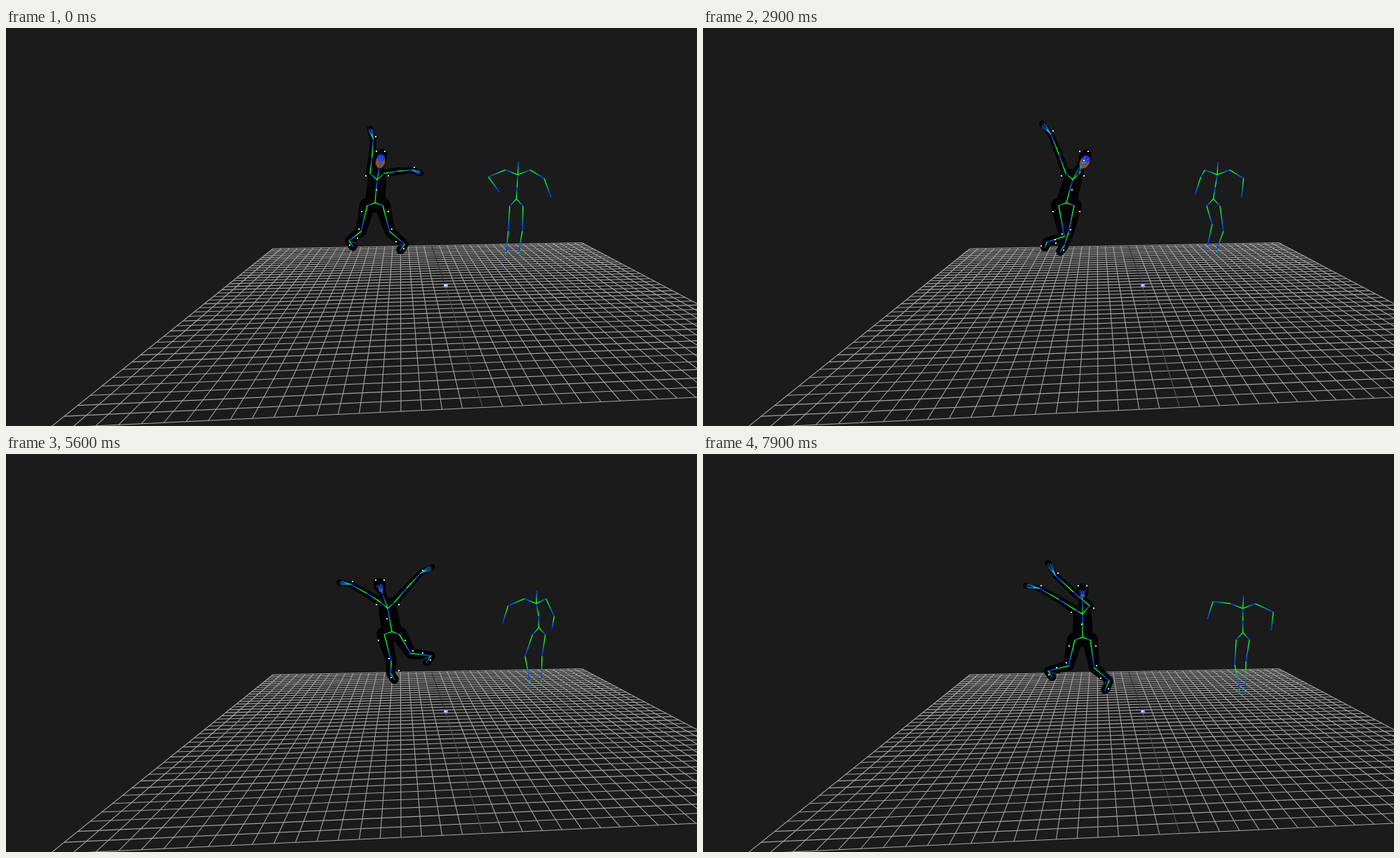
These frames come from a looping animation (985 by 568 pixels, 8000 ms). An HTML page with a canvas:

```html
<!DOCTYPE html>
<html lang="en">
<head>
<meta charset="utf-8">
<title>Motion capture stage</title>
<style>
html, body { margin: 0; width: 100%; height: 100%; overflow: hidden; background: #1b1b1b; }
canvas { display: block; }
</style>
</head>
<body>
<canvas id="stage" width="985" height="568"></canvas>
<script>
const W = 985, H = 568, LOOP = 8000, STEP = 100;
const BODY = '#020202', SKIN = '#8a5232', GREEN = '#06e822', BLUE = '#0c38ff', CYAN = '#22a8f0';
const ctx = document.getElementById('stage').getContext('2d');

const mix = (a, b, k) => a + (b - a) * k;
const along = (a, b, k) => [mix(a[0], b[0], k), mix(a[1], b[1], k)];
const add = (p, x, y) => [p[0] + x, p[1] + y];
const bump = (t, at, width) => Math.exp(-(((t - at) / width) ** 2));
const ramp = (t, from, to) => {
  const k = Math.min(1, Math.max(0, (t - from) / (to - from)));
  return k * k * (3 - 2 * k);
};

// Offsets a point by a rest vector plus weighted moves [amount, dx, dy].
function reach(from, x, y, ...moves) {
  for (const [k, dx, dy] of moves) { x += k * dx; y += k * dy; }
  return add(from, x, y);
}

// An arm from its heading (degrees clockwise from up) and length, bowed slightly.
function swingArm(shoulder, degrees, length, bow) {
  const a = degrees * Math.PI / 180, s = Math.sin(a), c = Math.cos(a);
  return [[0, 0], [0.36, 0.6], [0.75, 1], [1, 0]].map(([k, b]) =>
    add(shoulder, s * length * k + c * bow * b, s * bow * b - c * length * k));
}

function dancerPose(t) {
  const kneel = bump(t, 2900, 600), turn = bump(t, 4600, 500);
  const kick = bump(t, 5600, 400), hop = bump(t, 6400, 400);
  const back = ramp(t, 1500, 2900), cross = ramp(t, 2900, 4600), open = ramp(t, 4600, 5600);
  const lift = ramp(t, 5600, 6400), late = ramp(t, 6400, 7900);

  const pelvis = [526 - 8 * back + 32 * open - 9 * late, 249.5 + 4 * cross + 8 * late];
  const lean = 3 * bump(t, 0, 700) + 9 * kneel + 3 * turn - 6 * kick;
  const chest = add(pelvis, lean, -33);
  const head = add(chest, lean * 1.8, -30);
  const shoulder = side => add(chest, side * (10 - 4 * turn) - 7 * turn, -9 - 3 * side * lift);
  const hip = side => add(pelvis, side * 11 * (1 - 1.4 * turn), 4);

  const headL = -96 * bump(t, 1500, 650) - 45 * bump(t, 2550, 450) - 62 * bump(t, 3900, 350)
    - 68 * bump(t, 5500, 450) - 21 * lift - 43 * ramp(t, 6400, 7300);
  const lenL = 80 - 15 * bump(t, 0, 500) - 35 * bump(t, 1500, 600) - 14 * kick;
  const headR = 90 - 58 * back - 70 * cross + 85 * open + 13 * lift - 104 * late;
  const lenR = 53 - 34 * back + 22 * cross + 33 * open + 12 * lift;

  const kneeL = reach(hip(-1), -9, 37,
    [bump(t, 1500, 700), 6, 0], [kneel, 17, 7], [turn, -5, 0], [kick, 19, 2], [hop, 5, -6]);
  const ankleL = reach(kneeL, -17, 13,
    [kneel, -8, -5], [turn, -5, 14], [kick, 16, 4], [hop, -3, -12], [late, -12, -6]);
  const kneeR = reach(hip(1), 10, 37,
    [kneel, -18, 2], [turn, 15, -2], [kick, 6, -10], [hop, -21, 3], [late, -4, 3]);
  const ankleR = reach(kneeR, 21, 18,
    [kneel, -27, 0], [turn, -39, 16], [kick, 9, -15], [hop, -8, 4]);

  return {
    pelvis, chest, head, lean,
    front: 1 - 0.75 * open, profile: 3 * (kneel + turn),
    arms: [swingArm(shoulder(-1), headL, lenL, 5), swingArm(shoulder(1), headR, lenR, -5)],
    legs: [
      [hip(-1), kneeL, ankleL, reach(ankleL, 6, 9, [kneel + turn, -9, -1])],
      [hip(1), kneeR, ankleR, reach(ankleR, -6, 9, [hop, -13, -1], [late, 0, 5])]
    ]
  };
}

function stickPose(t) {
  const turn = bump(t, 4600, 550), kick = bump(t, 4600, 450), fold = bump(t, 6100, 700);
  const crouch = bump(t, 3000, 700), walk = ramp(t, 4600, 5600), late = ramp(t, 6400, 7900);
  const pelvis = [727.5 + 32 * walk + 10 * late, 244 + 4 * ramp(t, 3500, 5600) + 7 * late];
  const lean = 2 + 6 * bump(t, 3700, 1100) - 6 * bump(t, 5600, 500) - 2 * late;
  const neck = add(pelvis, lean, -34.5);
  const waist = add(along(pelvis, neck, 0.48), 3 * fold - 4 * turn, 0);
  const shoulder = side => add(neck, side * 17.5 * (1 - turn) + 4 * turn - 5 * fold * (side > 0), -7);
  const hip = side => add(pelvis, side * 9.5 * (1 - turn) + 5 * turn, 10 - 6 * turn);

  const armL = [shoulder(-1)], armR = [shoulder(1)], legL = [hip(-1)], legR = [hip(1)];
  armL[1] = reach(armL[0], -25, 10, [bump(t, 2500, 1300), 21, 0], [turn, 39, 4], [late, 0, -13]);
  armL[2] = reach(armL[1], -8, 25, [bump(t, 0, 600), 24, -3], [turn, -7, -5], [bump(t, 6400, 500), 8, 2]);
  armR[1] = reach(armR[0], 20, 12, [fold, -14, 22], [late, 6, 0]);
  armR[2] = reach(armR[1], 10, 27, [ramp(t, 1800, 3000), -13, 0], [fold, 0, -16]);

  legL[1] = reach(legL[0], -2, 36, [bump(t, 3200, 900), 11, 0], [crouch, 0, -10], [bump(t, 5700, 500), -9, -5]);
  legL[2] = reach(legL[1], -3, 30, [bump(t, 3800, 1000), -8, 0], [walk, 10, 4]);
  legL[3] = add(legL[2], -2, 7);
  legR[1] = reach(legR[0], -1, 36, [crouch, 6, 0], [kick, 30, -35], [walk, -4, -5]);
  legR[2] = reach(legR[1], -5, 29, [crouch, -5, -2], [kick, 16, 10], [walk, 4, 4], [late, 0, 7]);
  legR[3] = reach(legR[2], 0, 6, [kick, 10, -6]);
  return { pelvis, neck, trunk: [pelvis, waist, neck, add(neck, 1, -18.5)], limbs: { armL, armR, legL, legR } };
}

// Maps the unit square onto the floor in perspective.
function floorMap(tl, tr, br, bl) {
  const sum = i => tl[i] - tr[i] + br[i] - bl[i];
  const ax = tr[0] - br[0], ay = tr[1] - br[1], bx = bl[0] - br[0], by = bl[1] - br[1];
  const det = ax * by - bx * ay;
  const g = (sum(0) * by - bx * sum(1)) / det;
  const h = (ax * sum(1) - sum(0) * ay) / det;
  return (u, v) => [0, 1].map(i =>
    ((tr[i] * (1 + g) - tl[i]) * u + (bl[i] * (1 + h) - tl[i]) * v + tl[i]) / (g * u + h * v + 1));
}

function line(c, a, b, color, width) {
  c.strokeStyle = color;
  c.lineWidth = width;
  c.beginPath();
  c.moveTo(...a);
  c.lineTo(...b);
  c.stroke();
}

function makeFloor() {
  const cv = document.createElement('canvas');
  cv.width = W; cv.height = H;
  const c = cv.getContext('2d'), n = 40;
  const at = floorMap([380.5, 315], [821, 306.5], [1216, 516], [62, 571]);
  c.fillStyle = '#1b1b1b';
  c.fillRect(0, 0, W, H);
  for (let i = 0; i <= n; i++) {
    const k = i / n;
    line(c, at(0, k), at(1, k), '#a2a2a2', 1.1);
    if (i !== n / 2) line(c, at(k, 0), at(k, 1), '#a2a2a2', 1.1);
  }
  line(c, at(0.5, 0), [627, 370], '#2c2c2c', 1);
  line(c, [627, 370], at(0.5, 1), '#595959', 1);
  return cv;
}

function bone(a, b, width) {
  const g = ctx.createLinearGradient(...a, ...b);
  g.addColorStop(0.25, GREEN);
  g.addColorStop(0.85, BLUE);
  line(ctx, a, b, g, width);
}

function chain(pts, width) {
  for (let i = 1; i < pts.length; i++) bone(pts[i - 1], pts[i], width);
}

function oval(x, y, rx, ry, color) {
  ctx.fillStyle = color;
  ctx.beginPath();
  ctx.ellipse(x, y, rx, ry, 0, 0, 2 * Math.PI);
  ctx.fill();
}

// A tapering limb, one radius per joint.
function flesh(pts, radii) {
  for (let i = 1; i < pts.length; i++) {
    for (let k = 0; k <= 1; k += 0.05) {
      const r = mix(radii[i - 1], radii[i], k);
      oval(...along(pts[i - 1], pts[i], k), r, r, BODY);
    }
  }
}

function dot(p, dx, dy) {
  ctx.fillStyle = '#dedede';
  ctx.fillRect(Math.round(p[0] + dx) - 1, Math.round(p[1] + dy) - 1, 2, 2);
}

function drawHead({ chest, head, front, profile }) {
  flesh([chest, head], [6, 5]);
  ctx.save();
  ctx.translate(...head);
  ctx.rotate(Math.atan2(head[0] - chest[0], chest[1] - head[1]));
  oval(0, -3, 8.5, 11, BODY);
  oval(profile, 4, 6.5 * Math.sqrt(front), 10 * front, SKIN);
  oval(profile, -1, 5 * front, 5 * front, '#1a2af0');
  for (let i = -2; i <= 2; i++) {
    line(ctx, [profile + i * 2.4, -4], [profile / 2, 9], i % 2 ? '#12909a' : '#1c36f4', 0.9);
  }
  ctx.restore();
  dot(head, -6, -11);
  dot(head, 6, -11);
}

function drawHand(wrist, tip) {
  const ang = Math.atan2(tip[1] - wrist[1], tip[0] - wrist[0]);
  const len = Math.hypot(tip[0] - wrist[0], tip[1] - wrist[1]);
  for (let i = -2; i <= 2; i++) {
    const a = ang + i * 0.13, r = len * (0.95 - Math.abs(i) * 0.1);
    line(ctx, wrist, add(wrist, r * Math.cos(a), r * Math.sin(a)), i % 2 ? CYAN : '#1450e0', 0.9);
  }
  line(ctx, wrist, along(wrist, tip, 0.4), '#0fd070', 1.3);
}

function drawDancer(pose) {
  const { pelvis, chest, head, arms, legs } = pose;
  ctx.lineCap = 'round';
  for (const leg of legs) flesh(leg, [11, 7.5, 6, 6]);
  flesh([pelvis, chest], [14, 13]);
  flesh([arms[0][0], arms[1][0]], [6, 6]);
  for (const arm of arms) flesh(arm, [6, 5, 4, 4]);
  drawHead(pose);

  bone(pelvis, chest, 1.5);
  bone(chest, along(chest, head, 0.65), 1.3);
  for (const arm of arms) {
    chain([chest, ...arm.slice(0, 3)], 1.6);
    drawHand(arm[2], arm[3]);
  }
  for (const leg of legs) {
    chain([pelvis, ...leg], 1.6);
    line(ctx, leg[2], along(leg[1], leg[3], 0.75), '#1460a0', 1);
  }

  [-1, 1].forEach((side, i) => {
    const arm = arms[i], leg = legs[i];
    dot(arm[0], side * 6, 3);
    dot(arm[2], 3, -4);
    dot(leg[0], side * 8, 8);
    dot(leg[1], side * 3, -4);
    dot(leg[2], -side * 12, -4);
    dot(leg[3], side * 5, -3);
  });
  dot(chest, -1, 14);
}

function drawStick({ pelvis, neck, trunk, limbs }) {
  ctx.lineCap = 'butt';
  chain(trunk, 1.6);
  for (const name in limbs) chain([name.startsWith('arm') ? neck : pelvis, ...limbs[name]], 1.6);
}

function drawOrigin(step) {
  ctx.fillStyle = ['#7fb4f0', '#9a84ee', '#7c9cf0'][step * 7 % 3];
  ctx.fillRect(624, 365, 6, 5);
  ctx.fillStyle = '#cfe4fa';
  ctx.fillRect(625, 366, 3, 2);
  ctx.fillStyle = '#5a48d8';
  ctx.fillRect(626, 370, 3, 1);
}

const floor = makeFloor();
const start = performance.now();
let shown = -1;

function frame() {
  const step = Math.floor(((performance.now() - start) % LOOP) / STEP);
  if (step !== shown) {
    shown = step;
    const t = step * STEP;
    ctx.drawImage(floor, 0, 0);
    drawOrigin(step);
    drawDancer(dancerPose(t));
    drawStick(stickPose(t));
  }
  requestAnimationFrame(frame);
}
frame();
</script>
</body>
</html>
```
